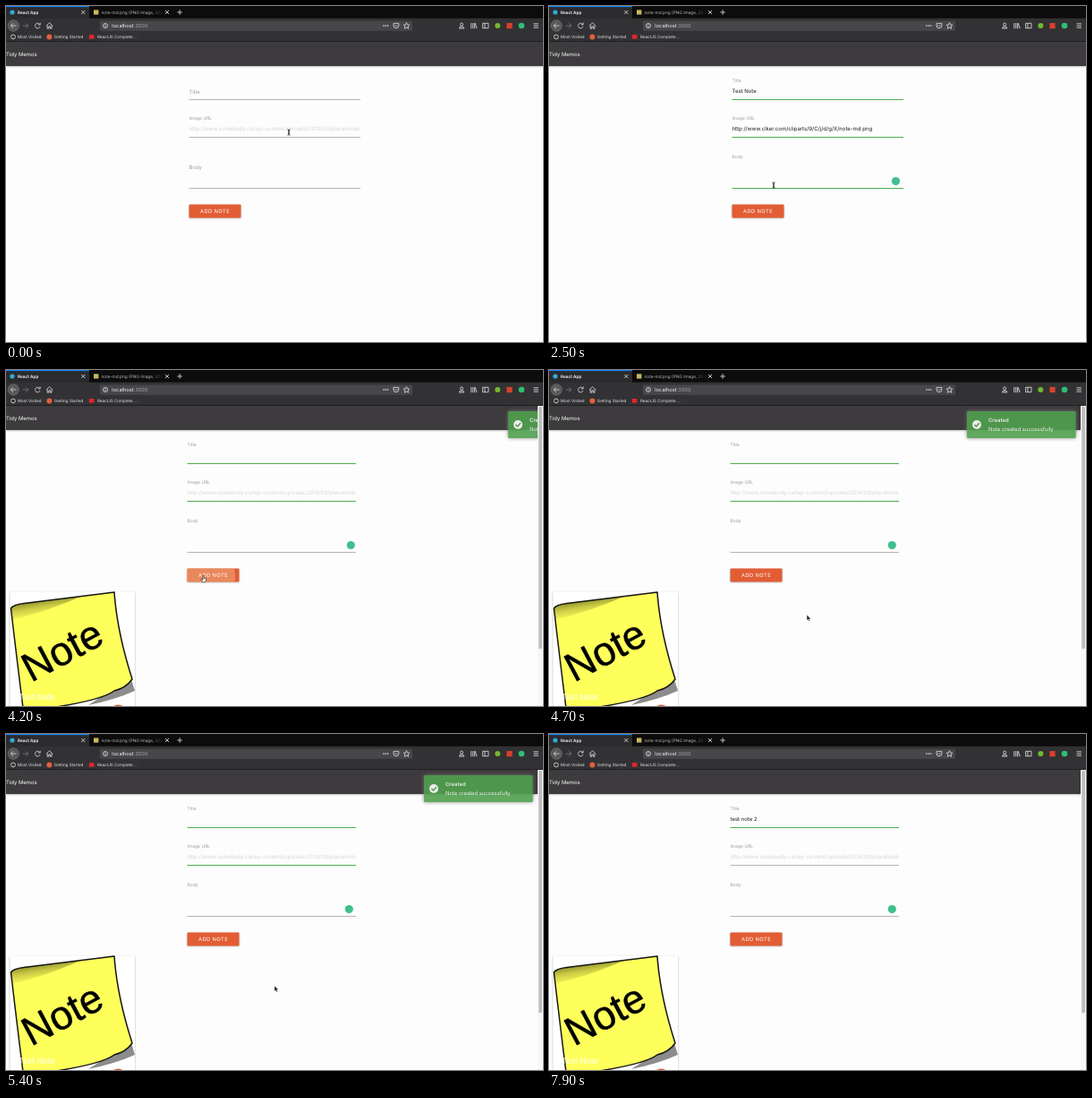
Recreate the animation shown at these times as an HTML page. Size 600 by 375 pixels, loop 8000 ms.

```html
<!DOCTYPE html>
<html lang="en">
<head>
<meta charset="utf-8">
<title>Notes demo</title>
<style>
  html, body { margin: 0; width: 100%; height: 100%; overflow: hidden; background: #fdfdfd; }
  svg { display: block; width: 100%; height: 100%; }
  text { font-family: Inter, Roboto, sans-serif; text-rendering: geometricPrecision; white-space: pre; }
  .icon { fill: none; stroke: #d4d4d6; stroke-width: .9; }
  .mark { font-size: 4.55px; fill: #e6e6e8; }
  .label { font-size: 5px; fill: #9e9e9e; }
  .value { font-size: 6px; fill: #1c1c1c; }
</style>
</head>
<body>
<svg viewBox="0 0 600 375" preserveAspectRatio="none">
  <defs>
    <clipPath id="view"><rect y="40" width="600" height="335"/></clipPath>
    <clipPath id="content"><rect y="40" width="594" height="335"/></clipPath>
    <clipPath id="field"><rect x="204" y="130" width="191" height="14" id="fieldClip"/></clipPath>
    <clipPath id="button"><rect x="204.5" y="221.5" width="58" height="15" rx="1"/></clipPath>
    <linearGradient id="fade">
      <stop offset=".8" stop-color="#b9b9bc"/><stop offset="1" stop-color="#b9b9bc" stop-opacity="0"/>
    </linearGradient>
    <linearGradient id="curl" gradientUnits="userSpaceOnUse" x1="24" y1="259" x2="27" y2="278">
      <stop offset="0" stop-color="#8f8f2c"/><stop offset=".4" stop-color="#c9c944"/><stop offset="1" stop-color="#ffff5c"/>
    </linearGradient>
    <filter id="soft" x="-20%" y="-40%" width="140%" height="200%"><feGaussianBlur stdDeviation="1.1"/></filter>
    <filter id="glow" x="-20%" y="-50%" width="140%" height="200%"><feGaussianBlur stdDeviation="2"/></filter>
  </defs>

  <rect width="600" height="375" fill="#fdfdfd"/>

  <g clip-path="url(#view)">
    <g id="page">
      <rect id="navShade" y="42" width="600" height="25.6" fill="#000" opacity=".3" filter="url(#soft)"/>
      <rect id="nav" y="40" width="600" height="27" fill="#3d3b3d"/>
      <text x="0" y="56" font-size="5.95" fill="#fff">Tidy Memos</text>

      <g id="form">
        <rect id="line0"/><rect id="line1"/><rect id="line2"/>
        <text class="label" id="label0" x="204.5">Title</text>
        <text class="label" x="204.5" y="127.4">Image URL</text>
        <text class="label" id="label2" x="204.5">Body</text>
        <text class="value" id="value0" x="204.5" y="97.2"></text>
        <g clip-path="url(#field)">
          <text class="value" id="hint" x="204.5" y="139.2" style="fill:#d6d6d6">http://www.somebody.ca/wp-content/uploads/2014/09/placeholder-image.png</text>
          <text class="value" id="value1" x="204.5" y="139.2">http://www.clker.com/cliparts/9/C/j/d/g/X/note-md.png</text>
        </g>
        <text class="value" id="value2" x="204.5" y="182"></text>
        <rect id="caret" width=".6" height="7.5" fill="#222"/>
        <circle id="checker" cy="195.5" r="4.6" fill="#3fbf8d"/>
        <rect x="204.5" y="222.5" width="58" height="14.5" rx="1" opacity=".28" filter="url(#soft)"/>
        <rect x="204.5" y="221.5" width="58" height="15" rx="1" fill="#e25d34"/>
        <circle id="ripple" cx="223" cy="231" fill="#f0ac7c" clip-path="url(#button)"/>
        <text x="217" y="231" font-size="5.8" letter-spacing=".4" fill="#fff">ADD NOTE</text>
      </g>

      <g id="card">
        <rect x="4.5" y="248.5" width="139.5" height="187" opacity=".3" filter="url(#soft)"/>
        <rect x="4.5" y="247.5" width="139.5" height="187" rx="1" fill="#fff"/>
        <path d="M139 342L144 358Q122 368 92 374L120 356Z" fill="#8c8c8c"/>
        <path id="sheet" d="M5.5 266Q8 262 20 260.5L121 248Q124 292 141 345Q134 355 121 358Q104 371 19.5 381Q13 330 5.5 266Z"
          fill="#ffff5c"/>
        <path d="M5.5 266Q8 262 20 260.5L84 252.6Q50 268 7.5 279Z" fill="url(#curl)"/>
        <use href="#sheet" fill-opacity="0" stroke="#151515" stroke-width="1.5" stroke-linejoin="round"/>
        <text transform="translate(28 349) rotate(-28)" style="font-family:'Liberation Sans',Arial,sans-serif"
          font-size="45" stroke="#000" stroke-width=".5">Note</text>
        <text x="14" y="368" font-size="9" fill="#fff">Test Note</text>
        <circle cx="125.3" cy="383.4" r="8.6" opacity=".3" filter="url(#soft)"/>
        <circle cx="125.3" cy="382" r="8.6" fill="#e25d34"/>
        <path d="M122.6 380.2h5.4v5.2h-5.4zM122 378.4h2l.6-.7h1.4l.6.7h2v1h-6.6z" fill="#fff"/>
        <text class="value" x="14.7" y="399">testing notes</text>
        <path d="M4.5 411.5h139.5" stroke="#e2e2e2" stroke-width=".6"/>
        <text x="14.7" y="425.2" font-size="6" fill="#f59331">Created on: <tspan font-style="italic">2018-10-26 18:40</tspan></text>
      </g>
    </g>

    <g id="bar">
      <rect x="594" y="40" width="6" height="335" fill="#f7f7f7"/>
      <rect id="thumb" x="595.2" width="3.8" height="271" rx="1.9" fill="#bdbdbd"/>
    </g>
  </g>

  <g clip-path="url(#content)">
    <g id="toast">
      <rect y="46" width="121.5" height="30" rx="1" fill="#777" filter="url(#glow)"/>
      <rect y="46" width="121.5" height="30" rx="1" fill="#50a04e"/>
      <circle cx="11" cy="61" r="5" fill="#fff"/>
      <path d="M8.4 61l2 2 3.4-3.7" fill="none" stroke="#50a04e" stroke-width="1.4"/>
      <text x="24" y="58.4" font-size="5.9" font-weight="600" fill="#fff">Created</text>
      <text x="24" y="68.4" font-size="5.9" fill="#fff">Note created successfully</text>
    </g>
  </g>

  <g id="chrome">
    <rect width="600" height="14" fill="#0c0c0d"/>
    <rect width="93" height="14" fill="#2b2b2e"/>
    <rect width="93" height="1.1" fill="#0a84ff"/>
    <rect y="13.7" width="600" height="26.3" fill="#323234"/>
    <rect y="39.3" width="600" height=".7" fill="#18181a"/>
    <circle cx="7" cy="7" r="2.6" fill="#35a9d6"/>
    <text x="13" y="8.9" font-size="4.7" font-weight="600" fill="#fff">React App</text>
    <rect x="98" y="4.4" width="5.4" height="5.2" fill="#c9b85a"/>
    <text x="106.5" y="8.9" font-size="4.75" fill="url(#fade)">note-md.png (PNG Image, 259</text>
    <path class="icon" d="M84.3 5l4 4m0-4l-4 4M178 5l4 4m0-4l-4 4M191.3 7h5.6M194.1 4.2v5.6"/>

    <circle cx="8.3" cy="22" r="6.2" fill="#58585b" stroke="#77777a" stroke-width=".6"/>
    <path class="icon" d="M11.4 22h-6m2.6-2.7L5.3 22l2.7 2.7"/>
    <path class="icon" d="M18.8 22h6m-2.6-2.7l2.7 2.7-2.7 2.7" opacity=".4"/>
    <path class="icon" d="M37.6 20.4a2.8 2.8 0 1 0 .4 2.6M38.2 18.6v2.3h-2.4"/>
    <path class="icon" d="M45 22.2l3.6-3.4 3.6 3.4M46.2 21.6v3.6h1.6v-2.4h1.6v2.4h1.6v-3.6"/>
    <rect x="105" y="16.4" width="349" height="11.4" rx="1.2" fill="#474749"/>
    <circle cx="111" cy="22" r="2.5" class="icon" stroke-width=".7"/>
    <path class="icon" d="M111 21.6v1.9M111 20.2v.7"/>
    <text x="118.3" y="24.2" font-size="5.7" fill="#f4f4f5">localhost<tspan fill="#a5a5a8">:3000</tspan></text>
    <path d="M421.3 22h6" stroke="#d4d4d6" stroke-width="1.4" stroke-dasharray="1.4 .9"/>
    <path class="icon" d="M433 19.4h5.8v2.4a2.9 2.9 0 0 1-5.8 0zM434.4 21.2l1.5 1.5 1.5-1.5"/>
    <path class="icon" d="M447.5 18.7l1 2.2 2.4.3-1.8 1.6.5 2.4-2.1-1.2-2.1 1.2.5-2.4-1.8-1.6 2.4-.3z"/>
    <path class="icon" d="M507.5 20.6a1.6 1.6 0 1 1 3.2 0a1.6 1.6 0 1 1-3.2 0M506.3 25q0-2 2.8-2t2.8 2z"/>
    <path class="icon" d="M519.8 19v6.2M521.8 19v6.2M523.6 19v6.2M524.2 19.2l2 6"/>
    <path class="icon" d="M532.6 19.3h6.4v5.4h-6.4zM535 19.3v5.4"/>
    <circle cx="549.3" cy="22" r="3" fill="#74b62c"/>
    <rect x="559.4" y="19" width="6.2" height="6.2" fill="#d8412f"/>
    <circle cx="576" cy="22" r="3.3" fill="#2fbf71"/>
    <path class="icon" d="M589.5 19.8h5.4M589.5 22h5.4M589.5 24.2h5.4"/>

    <circle cx="8" cy="34.4" r="2.4" class="icon"/>
    <text class="mark" x="13" y="36.2">Most Visited</text>
    <circle cx="48.4" cy="34.4" r="3" fill="#e2603b"/>
    <text class="mark" x="53.8" y="36.2">Getting Started</text>
    <rect x="92.8" y="32" width="5.6" height="4.8" rx="1" fill="#e3242b"/>
    <text class="mark" x="102" y="36.2">ReactJS Complete ...</text>
  </g>

  <g id="pointer">
    <path id="beam" d="M-1.5-3.2q1.5 0 1.5 1v4.4q0 1-1.5 1M1.5-3.2q-1.5 0-1.5 1v4.4q0 1 1.5 1" fill="none" stroke="#111" stroke-width=".8"/>
    <path id="arrow" d="M0-3v6.2l1.4-1.3 1 2.3 1-.4-1-2.2h2z" fill="#111" stroke="#fff" stroke-width=".4"/>
    <path id="hand" d="M-1-3.4h1.1v2.6l2.4.6v2.2l-.8 1.8h-3l-2-2.8.6-.6 1.7 1z" fill="#fff" stroke="#111" stroke-width=".6"/>
  </g>
</svg>

<script>
const LOOP = 8000;
const GREEN = '#4caf50', GREY = '#9e9e9e';
const AT = { title: 300, image: 1500, paste: 1700, body: 2280, submit: 4060, retitle: 6250, cut: 7400 };
const $ = id => document.getElementById(id);
const set = (id, attrs) => { for (const k in attrs) $(id).setAttribute(k, attrs[k]); };
const show = (id, on) => { $(id).style.display = on ? '' : 'none'; };
const within = (t, a, b) => t >= a && t < b;
const ease = p => p * p * (3 - 2 * p);
const linear = p => p;

// Interpolates a table of [time, value] steps.
function track(steps, t, curve = ease) {
  if (t <= steps[0][0]) return steps[0][1];
  for (let i = 1; i < steps.length; i++) {
    const [a, from] = steps[i - 1], [b, to] = steps[i];
    if (t < b) return from + (to - from) * curve((t - a) / (b - a));
  }
  return steps[steps.length - 1][1];
}

const typed = (text, start, step, t) =>
  text.slice(0, Math.max(0, Math.floor((t - start) / step) + 1));

const pointerX = [[0, 316], [280, 232], [1200, 232], [1480, 240], [1900, 240], [2250, 251],
  [3650, 251], [3950, 221], [4550, 221], [4750, 300], [5850, 300], [6200, 236]];
const pointerY = [[0, 141], [280, 96], [1200, 96], [1480, 138], [1900, 138], [2250, 200],
  [3650, 200], [3950, 233], [4550, 233], [4750, 284], [5850, 284], [6200, 96]];
const scrollSteps = [[4700, 0], [4960, 74], [5120, 74], [5370, 0]];
const toastX = [[4080, 606], [4200, 561.5], [4420, 467]];

function drawForm(t, sent) {
  const right = sent ? 391 : 396;
  const left = sent ? 202.5 : 204.5;
  const lines = [
    [104, t >= AT.title],
    [146, within(t, AT.image, AT.cut)],
    [203, within(t, AT.body, AT.submit)],
  ];
  lines.forEach(([y, on], i) => set('line' + i, {
    x: 204.5, y, width: right - left,
    height: on ? 1 : .75, fill: on ? GREEN : GREY,
  }));
  set('form', { transform: `translate(${left - 204.5} 0)` });
  set('fieldClip', { width: right - left });

  const lift = [[0, AT.title, 97.6, 85.3], [2, AT.body, 182, 169.6]];
  for (const [i, start, low, high] of lift) {
    set('label' + i, { y: track([[start, low], [start + 150, high]], t) });
    $('label' + i).style.fontSize = track([[start, 5.95], [start + 150, 5]], t) + 'px';
  }
  const titleFocus = within(t, AT.title, AT.image) || within(t, AT.retitle, AT.cut);
  $('label0').style.fill = titleFocus ? '#3fae86' : GREY;

  const title = t >= AT.cut ? 'test note 2'
    : sent ? typed('test note 1', 6400, 55, t) : typed('Test Note', 350, 65, t);
  $('value0').textContent = title;
  $('value2').textContent = sent ? '' : typed('testing notes', 2620, 70, t);
  const pasted = within(t, AT.paste, AT.submit);
  show('value1', pasted);
  show('hint', !pasted);

  const focus = titleFocus ? 0 : within(t, AT.image, AT.body) ? 1 : within(t, 2600, 3900) ? 2 : -1;
  show('caret', focus >= 0);
  if (focus >= 0) {
    const empty = focus === 1 && !pasted;
    const width = empty ? 0 : $('value' + focus).getComputedTextLength();
    set('caret', { x: 204.7 + width, y: [91, 133, 175.8][focus] });
  }

  show('checker', t >= AT.body);
  set('checker', { cx: track([[AT.submit, 387.5], [4200, 387.3], [4500, 385.3]], t) });
  set('ripple', {
    r: track([[4000, 0], [4200, 35], [4400, 48]], t, linear),
    opacity: track([[4000, .6], [4200, .55], [4450, 0]], t, linear),
  });
}

function drawPointer(t) {
  const x = track(pointerX, t), y = track(pointerY, t);
  const visible = t < 380 || within(t, 1150, 2620) || within(t, 3650, 6400);
  const onButton = within(t, 3850, 4600);
  const isArrow = within(t, 4600, 6120);
  show('pointer', visible);
  set('pointer', { transform: `translate(${x} ${y})` });
  show('hand', onButton);
  show('arrow', isArrow);
  show('beam', !onButton && !isArrow);
}

function render(t) {
  const sent = t >= AT.submit;
  const scroll = track(scrollSteps, t);
  set('page', { transform: `translate(0 ${-scroll})` });
  set('nav', { width: sent ? 594 : 600 });
  set('navShade', { width: sent ? 594 : 600 });
  show('card', sent);
  show('bar', sent);
  set('thumb', { y: 40.5 + scroll * .85 });
  show('toast', within(t, 4080, 5850));
  set('toast', {
    transform: `translate(${track(toastX, t, linear)} 0)`,
    opacity: track([[5550, .9], [5850, 0]], t, linear),
  });
  drawForm(t, sent);
  drawPointer(t);
}

const begun = performance.now();
function tick() {
  render((performance.now() - begun) % LOOP);
  requestAnimationFrame(tick);
}
tick();
</script>
</body>
</html>
```
